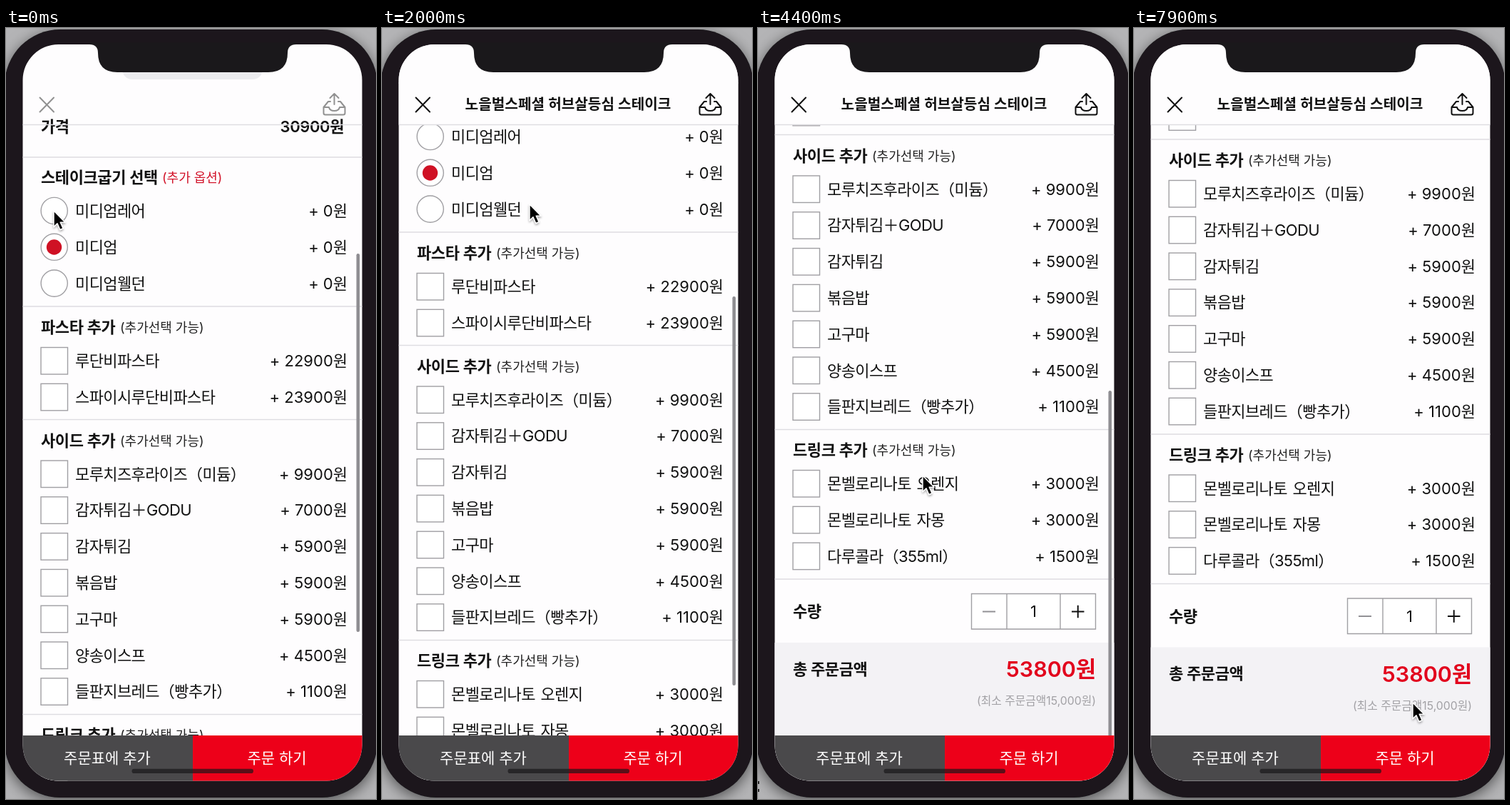
An HTML page that plays this animation: 519 px wide and 1080 px high, repeating every 8000 ms.

```html
<!DOCTYPE html>
<html lang="ko">
<head>
<meta charset="utf-8">
<title>주문 옵션</title>
<style>
html, body { margin: 0; width: 100%; height: 100%; overflow: hidden; background: #b4b4b6; }
svg { display: block; width: 100vw; height: 100vh; }
text { font-family: Inter, "Noto Sans CJK KR", "Noto Sans CJK", sans-serif; font-size: 22px; fill: #111; white-space: pre; }
.item { letter-spacing: -.6px; word-spacing: 2px; }
.head { font-weight: 600; letter-spacing: -.4px; }
.sub { font-size: 18px; fill: #222; }
.red { fill: #d2142a; }
.end { text-anchor: end; }
.mid { text-anchor: middle; }
.box { fill: #fff; stroke: #a09fa3; stroke-width: 1.4; }
.rule { stroke: #dedde1; stroke-width: 1.5; }
.icon { fill: none; stroke-width: 2; stroke-linecap: round; stroke-linejoin: round; }
.sum { font-size: 30.5px; font-weight: 600; fill: #e2041d; }
.note { font-size: 15.8px; fill: #a2a1a5; }
.button { font-size: 21px; fill: #fff; }
</style>
</head>
<body>
<svg viewBox="0 0 519 1080" preserveAspectRatio="none">
  <defs>
    <clipPath id="screen"><rect x="23.5" y="23" width="476" height="1031.5" rx="50"/></clipPath>
    <filter id="shade" x="-20%" y="-20%" width="140%" height="140%">
      <feDropShadow dx="0" dy="5" stdDeviation="10" flood-opacity=".55"/>
    </filter>
    <filter id="soft" x="-50%" y="-50%" width="200%" height="200%">
      <feDropShadow dx="0" dy="2" stdDeviation="1.5" flood-opacity=".35"/>
    </filter>
  </defs>

  <rect width="519" height="1080" fill="#b4b4b6"/>
  <rect x="-2" y="2" width="523" height="1076" rx="78" fill="#1a181b" filter="url(#shade)"/>
  <path id="edge" d="M0 1055h1.6v4h-1.6zM0 1066h1.6v4h-1.6z" fill="#111"/>

  <g clip-path="url(#screen)">
    <rect x="23" y="23" width="477" height="1032" fill="#fefdfe"/>
    <g id="content"></g>
    <rect id="bar" x="491.5" width="4.6" rx="2.3" fill="#8f8e92"/>
    <rect id="cover" x="23" y="23" width="477" height="112" fill="#fefdfe"/>
    <path class="rule" d="M23 135.5H500"/>
    <text id="title" class="mid" x="261" y="114" style="font-size:20.2px;font-weight:600">노을벌스페셜 허브살등심 스테이크</text>
    <g id="icons" class="icon">
      <path d="M47.5 97.5l19.5 20m0-20l-19.5 20"/>
      <path d="M460.5 107V92m-6 6l6-6 6 6M455 103h-3l-6.5 8v8q0 2.500 2.500 2.500h25q2.500 0 2.500-2.500v-8l-6.500-8h-3M445.500 111h7.500q1 5 7.500 5t7.500-5h7.500"/>
    </g>
    <rect x="23" y="991" width="239" height="64" fill="#4a494b"/>
    <rect x="262" y="991" width="238" height="64" fill="#ed0019"/>
    <text class="button mid" x="142" y="1029.500">주문표에 추가</text>
    <text class="button mid" x="380" y="1029.500">주문 하기</text>
    <rect x="176.500" y="1037.800" width="170.500" height="6.200" rx="3.100" fill="#171719" opacity=".68"/>
  </g>

  <path d="M117 20v3q12 0 12 12q0 27 27 27h212q27 0 27-27q0-12 12-12v-3z" fill="#1a181b"/>
  <path id="cursor" d="M0 0V22.500L5 17.800L8.800 26.500L13 24.700L9.200 16.200H16z" fill="#050505" stroke="#fff" stroke-width="1.400" stroke-linejoin="round" filter="url(#soft)"/>
</svg>

<script>
const $ = id => document.getElementById(id);
const LOOP = 8000, TICK = 100, STEP = 50.8, UNIT_PRICE = 53800;

const label = (x, y, cls, str, id = '') =>
  `<text x="${x}" y="${y + 8}" class="${cls}"${id && ` id="${id}"`}>${str}</text>`;
const rule = y => `<path class="rule" d="M23 ${y}H500"/>`;
const checkbox = y => `<rect class="box" x="49" y="${y - 18.5}" width="37.5" height="37.5"/>`;
const radio = y => `<circle class="box" cx="67.7" cy="${y}" r="18.6"/>`;

// A titled block of options, each [name, price]
function section(y, name, note, items, mark, tone = '') {
  let out = label(49, y, 'head', name.text) + label(name.end, y - 1, 'sub ' + tone, note);
  items.forEach(([text, price], i) => {
    const cy = y + 47 + i * STEP;
    out += mark(cy) + label(97, cy, 'item', text) + label(479, cy, 'end', `+ ${price}원`);
  });
  return out;
}

const more = '(추가선택 가능)';
$('content').innerHTML = [
  '<rect x="163" y="40" width="197" height="32" rx="14" fill="#ececef"/>',
  label(49, 138, 'head', '가격'), label(474, 138, 'head end', '30900원'),
  rule(181),
  section(209, { text: '스테이크굽기 선택', end: 219 }, '(추가 옵션)',
    [['미디엄레어', 0], ['미디엄', 0], ['미디엄웰던', 0]], radio, 'red'),
  '<circle cx="67.5" cy="307" r="10.700" fill="#cf1124"/>',
  rule(390),
  section(419, { text: '파스타 추가', end: 160 }, more,
    [['루단비파스타', 22900], ['스파이시루단비파스타', 23900]], checkbox),
  '<path id="check" d="M57 466l8 8 14-17" fill="none" stroke="#cf1124" stroke-width="3"/>',
  rule(548.5),
  section(577.5, { text: '사이드 추가', end: 160 }, more,
    [['모루치즈후라이즈（미듐）', 9900], ['감자튀김＋GODU', 7000], ['감자튀김', 5900],
     ['볶음밥', 5900], ['고구마', 5900], ['양송이스프', 4500], ['들판지브레드（빵추가）', 1100]], checkbox),
  rule(961.5),
  section(990, { text: '드링크 추가', end: 160 }, more,
    [['몬벨로리나토 오렌지', 3000], ['몬벨로리나토 자몽', 3000], ['다루콜라（355ml）', 1500]], checkbox),
  rule(1171),
  label(49, 1216, 'head', '수량'),
  '<path class="box" d="M299.500 1191.500H473.500V1241H299.500zM349 1191.500V1241M424 1191.500V1241"/>',
  '<path id="minus" d="M315 1216.500h18" stroke-width="1.800"/>',
  '<path d="M440 1216.500h17.500m-8.750-8.750v17.500" stroke="#111" stroke-width="2"/>',
  label(386.5, 1216, 'mid', '1', 'count'),
  '<rect x="23" y="1260" width="477" height="260" fill="#f3f2f5"/>',
  label(49, 1296.5, 'head', '총 주문금액'),
  label(474, 1300, 'sum end', '', 'sum'),
  label(474, 1339, 'note end', '(최소 주문금액15,000원)')
].join('');

// Keys are [time, value, ...]
const scrollKeys = [[1500, 0], [1800, 62], [2000, 104], [2200, 110], [3300, 110],
  [3600, 220], [4000, 385], [4200, 402], [4400, 399], [4800, 392.5]];
const cursorKeys = [[0, 67, 256], [100, 67, 258], [400, 73, 296], [500, 73, 296], [800, 76, 300],
  [1000, 76, 300], [1200, 88, 312], [1600, 170, 270], [2000, 207, 247], [2300, 207, 247],
  [2900, 67, 354], [3200, 70, 354], [4000, 175, 328], [4400, 231, 627], [5000, 396, 806],
  [5300, 408, 807], [5700, 446, 822], [6500, 447, 824], [7200, 323, 824], [7500, 318, 832],
  [7700, 316, 846], [7900, 391, 945]];
const barTopKeys = [[0, 316], [104, 376], [385, 498], [392.5, 502], [399, 508]];
const barEndKeys = [[0, 846], [104, 921], [250, 1000]];
const barFadeKeys = [[5900, 1], [6300, 0]];

function sample(keys, t) {
  const i = keys.findIndex(k => k[0] > t);
  if (i === 0) return keys[0].slice(1);
  if (i < 0) return keys[keys.length - 1].slice(1);
  const a = keys[i - 1], b = keys[i], p = (t - a[0]) / (b[0] - a[0]);
  return a.slice(1).map((v, j) => v + (b[j + 1] - v) * p);
}

const set = (id, attrs) => {
  for (const name in attrs) $(id).setAttribute(name, attrs[name]);
};

function draw(t) {
  const [scroll] = sample(scrollKeys, t);
  const [x, y] = sample(cursorKeys, t);
  const [top] = sample(barTopKeys, scroll);
  const [end] = sample(barEndKeys, scroll);
  const solid = Math.min(1, scroll / 70);
  const shade = Math.round(145 - 130 * solid);
  const count = t >= 6000 && t < 7300 ? 2 : 1;

  set('content', { transform: `translate(0 ${-scroll})` });
  set('cursor', { transform: `translate(${x} ${y})` });
  set('bar', { y: top, height: end - top, opacity: sample(barFadeKeys, t)[0] });
  set('cover', { opacity: solid });
  set('title', { opacity: solid });
  set('icons', { stroke: `rgb(${shade},${shade},${shade})` });
  set('check', { opacity: t >= 3000 ? 1 : 0 });
  set('minus', { stroke: count > 1 ? '#111' : '#929195' });
  set('edge', { opacity: t >= 2400 && t < 7000 ? 1 : 0 });
  $('count').textContent = count;
  $('sum').textContent = `${UNIT_PRICE * count}원`;
}

const start = performance.now();
function loop() {
  const t = (performance.now() - start) % LOOP;
  draw(Math.floor(t / TICK) * TICK);
  requestAnimationFrame(loop);
}
loop();
</script>
</body>
</html>
```
